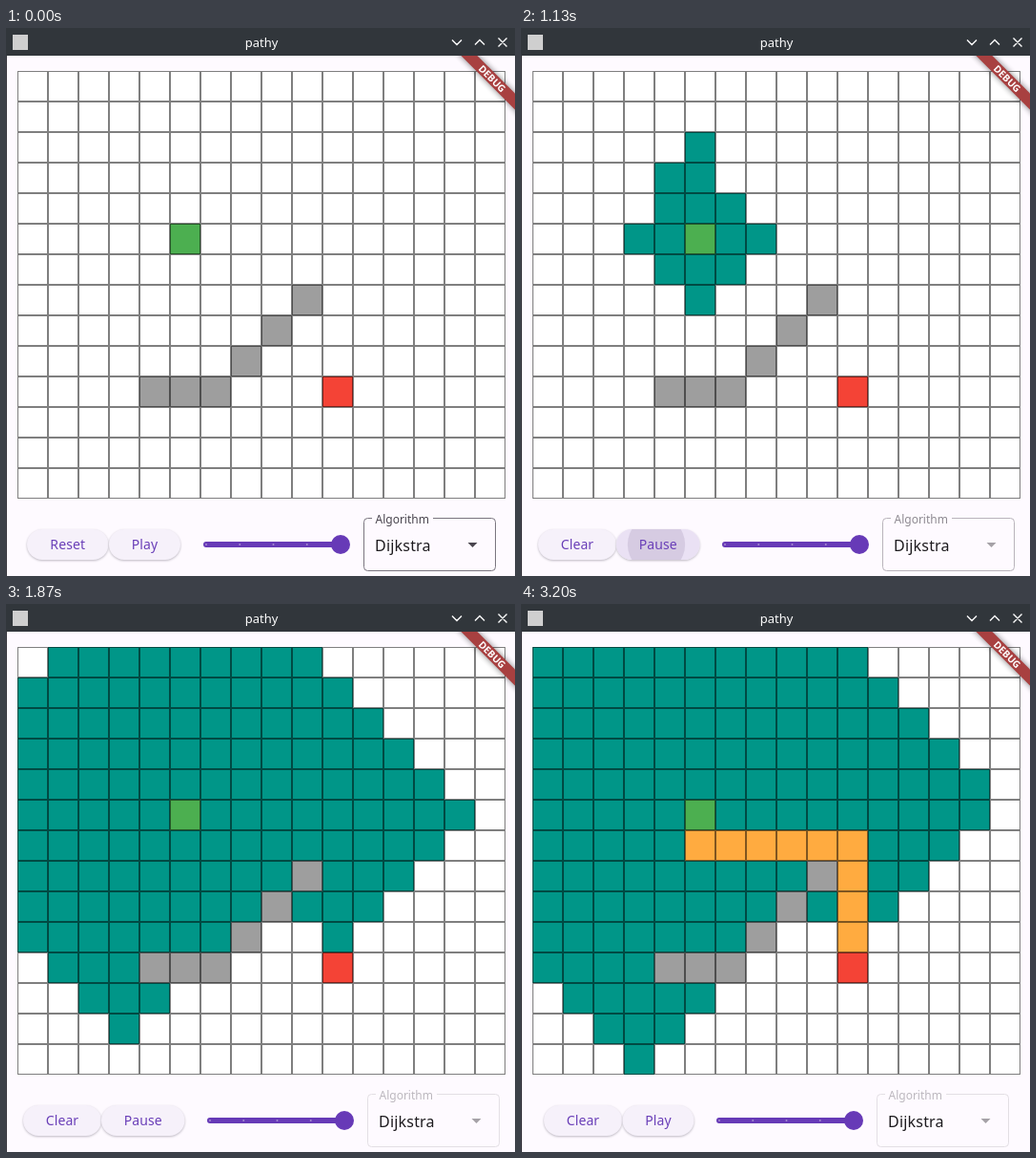
An HTML page for the animation above (3.23 s loop, 534 by 574 pixels).

```html
<!DOCTYPE html>
<html lang="en">
<head>
<meta charset="utf-8">
<title>pathy</title>
<style>
  html, body { margin: 0; width: 100%; height: 100%; overflow: hidden; background: #fefaff; }
  svg { display: block; width: 534px; height: 574px; font-family: "Noto Sans", "Open Sans", sans-serif; }
  .mid { text-anchor: middle; }
  .btn { fill: #f6f1fa; filter: drop-shadow(0 1px 1px #bdb8c2); }
  .btn.hot { filter: drop-shadow(0 2px 2px #a6a1ac); }
  .label { font-size: 14px; font-weight: 500; letter-spacing: .1px; fill: #6a3fb8; text-anchor: middle; }
  .grid { fill: none; stroke: #000; stroke-opacity: .5; }
  .cell { fill: #fff; }
  .wall { fill: #9e9e9e; }
  .start { fill: #4caf50; }
  .goal { fill: #f44336; }
  .seen { fill: #009688; }
  .path { fill: #ffab40; }
  .ctl { fill: none; stroke: #fcfcfc; stroke-width: 1.4; }
</style>
</head>
<body>
<svg viewBox="0 0 534 574">
  <defs>
    <clipPath id="pill"><rect id="pillBox" y="525" height="32" rx="16"/></clipPath>
    <clipPath id="page"><rect y="29" width="534" height="545"/></clipPath>
    <filter id="blur" x="-20%" y="-80%" width="140%" height="260%"><feGaussianBlur stdDeviation="3"/></filter>
  </defs>
  <rect width="534" height="574" fill="#fefaff"/>
  <rect y="28" width="1" height="546" fill="#3c3a42"/>

  <rect width="534" height="29" fill="#31363b"/>
  <rect x="7" y="7" width="16" height="16" fill="#cfcfcf"/>
  <text class="mid" x="268" y="20" font-size="13" fill="#fcfcfc">pathy</text>
  <path class="ctl" d="M468 12.5l5 5 5-5M492 17.5l5-5 5 5M516.500 10.500l9 9m0-9l-9 9"/>

  <g id="cells" shape-rendering="crispEdges"></g>
  <path id="lines" class="grid" stroke-width="2"/>
  <rect class="grid" x="12.500" y="45.500" width="511" height="447"/>

  <g clip-path="url(#page)">
    <g transform="translate(534 29) rotate(45)">
      <rect x="-60" y="28" width="120" height="12" fill="#000" opacity=".5" filter="url(#blur)"/>
      <rect x="-60" y="28" width="120" height="12" fill="#a84040"/>
      <text class="mid" y="37.700" font-size="10.200" font-weight="900" fill="#fff">DEBUG</text>
    </g>
  </g>

  <rect id="boxA" class="btn" y="525" height="32" rx="16"/>
  <rect id="boxB" class="btn" y="525" height="32" rx="16"/>
  <g clip-path="url(#pill)">
    <rect id="hover" x="100" y="525" width="88" height="32" fill="#eae1f4"/>
    <circle id="ripple" cx="142" cy="541" fill="#d3c8e0"/>
  </g>
  <text id="textA" class="label" y="546"></text>
  <text id="textB" class="label" y="546"></text>

  <g id="side">
    <path d="M210 541H351" stroke="#673ab7" stroke-width="6" stroke-linecap="round"/>
    <g id="ticks" fill="#a48bd0"></g>
    <circle cx="351" cy="541" r="10" fill="#673ab7"/>
    <rect id="outline" x="375.500" y="513.500" width="138" height="55" rx="4" fill="none"/>
    <rect x="384" y="511" width="64" height="5" fill="#fefaff"/>
    <text id="caption" x="387.500" y="519" font-size="12">Algorithm</text>
    <text x="387" y="548" font-size="16" letter-spacing=".2" fill="#1d1b1e">Dijkstra</text>
    <path id="arrow" d="M484.500 539h10l-5 5z"/>
  </g>
</svg>
<script>
const LOOP = 3230, STEP = 100 / 3;
const COLS = 16, ROWS = 14, SIZE = 32, LEFT = 12, TOP = 45;
const BEGIN = 31, END = 58;
// [tick, cells explored]
const PACE = [[BEGIN, 0], [34, 14], [44, 54], [56, 125], [END, 138]];
const LAYOUTS = {
  idle: { a: ["Reset", 22, 85.5], b: ["Play", 108, 75], dx: 0 },
  run: { a: ["Clear", 18, 82], b: ["Pause", 100, 87.5], dx: 4 },
  done: { a: ["Clear", 24, 82], b: ["Play", 106.5, 75], dx: -2 }
};

const $ = id => document.getElementById(id);
const make = (tag, parent, attrs) => {
  const el = document.createElementNS("http://www.w3.org/2000/svg", tag);
  for (const k in attrs) el.setAttribute(k, attrs[k]);
  return parent.appendChild(el);
};
const set = (id, attrs) => { for (const k in attrs) $(id).setAttribute(k, attrs[k]); };
const clamp = v => Math.max(0, Math.min(1, v));
const mix = (p, q, k) => `rgb(${p.map((v, i) => Math.round(v + (q[i] - v) * k))})`;
const at = (x, y) => y * COLS + x;

const start = at(5, 5), goal = at(10, 10);
const walls = new Set([at(9, 7), at(8, 8), at(7, 9), at(4, 10), at(5, 10), at(6, 10)]);

// Breadth-first search, neighbours in the order up, down, left, right
function search() {
  const from = new Map([[start, null]]), queue = [start];
  for (const node of queue) {
    const x = node % COLS, y = Math.floor(node / COLS);
    for (const [dx, dy] of [[0, -1], [0, 1], [-1, 0], [1, 0]]) {
      const nx = x + dx, ny = y + dy, next = at(nx, ny);
      if (nx < 0 || ny < 0 || nx >= COLS || ny >= ROWS) continue;
      if (walls.has(next) || from.has(next)) continue;
      from.set(next, node);
      queue.push(next);
      if (next === goal) {
        const path = new Set();
        for (let n = node; n !== start; n = from.get(n)) path.add(n);
        return { order: queue.slice(1), path };
      }
    }
  }
}
const { order, path } = search();
const rank = new Map(order.map((n, i) => [n, i]));

let d = "";
for (let i = 1; i < COLS; i++) d += `M${LEFT + i * SIZE} ${TOP + 1}v${ROWS * SIZE - 2}`;
for (let i = 1; i < ROWS; i++) d += `M${LEFT + 1} ${TOP + i * SIZE}h${COLS * SIZE - 2}`;
set("lines", { d });

const cells = Array.from({ length: COLS * ROWS }, (_, n) => make("rect", $("cells"), {
  x: LEFT + n % COLS * SIZE, y: TOP + Math.floor(n / COLS) * SIZE, width: SIZE, height: SIZE
}));
for (let i = 0; i < 4; i++) make("circle", $("ticks"), { cx: 210 + i * 35.25, cy: 541, r: 1 });

function explored(tick) {
  if (tick <= BEGIN) return 0;
  for (let i = 1; i < PACE.length; i++) {
    const [t0, n0] = PACE[i - 1], [t1, n1] = PACE[i];
    if (tick <= t1) return Math.floor(n0 + (n1 - n0) * (tick - t0) / (t1 - t0) + .001);
  }
  return order.length;
}

function kind(n, count, done) {
  if (n === start) return "start";
  if (n === goal) return "goal";
  if (walls.has(n)) return "wall";
  if (done && path.has(n)) return "path";
  return rank.get(n) < count ? "seen" : "";
}

function button(key, [text, x, width]) {
  set("box" + key, { x, width });
  set("text" + key, { x: x + width / 2 });
  $("text" + key).textContent = text;
}

function draw(tick) {
  const time = tick * STEP, since = time - BEGIN * STEP;
  const idle = tick < BEGIN, done = tick >= END;
  const ui = LAYOUTS[idle ? "idle" : done ? "done" : "run"];
  const count = explored(tick);
  cells.forEach((c, n) => c.setAttribute("class", "cell " + kind(n, count, done)));

  button("A", ui.a);
  button("B", ui.b);
  set("pillBox", { x: ui.b[1], width: ui.b[2] });
  set("side", { transform: `translate(${ui.dx} 0)` });

  const hover = idle ? 0 : 1 - clamp((time - 1600) / 150);
  set("hover", { opacity: hover });
  set("boxB", { class: hover > .5 && since > 150 ? "btn hot" : "btn" });
  set("ripple", {
    r: 14 + 34 * clamp(since / 210),
    opacity: idle ? 0 : .85 * (1 - clamp((since - 150) / 200))
  });

  const off = idle ? 0 : clamp(since / 167);
  set("outline", { stroke: mix([122, 117, 127], [227, 223, 228], off) });
  set("caption", { fill: mix([73, 69, 78], [188, 184, 190], off) });
  set("arrow", { fill: idle ? "#49454e" : "#a5a1a7" });
}

let last = -1;
function loop() {
  const tick = Math.floor((performance.now() % LOOP + 3.4) / STEP) % 97;
  if (tick !== last) draw(last = tick);
  requestAnimationFrame(loop);
}
loop();
</script>
</body>
</html>
```
